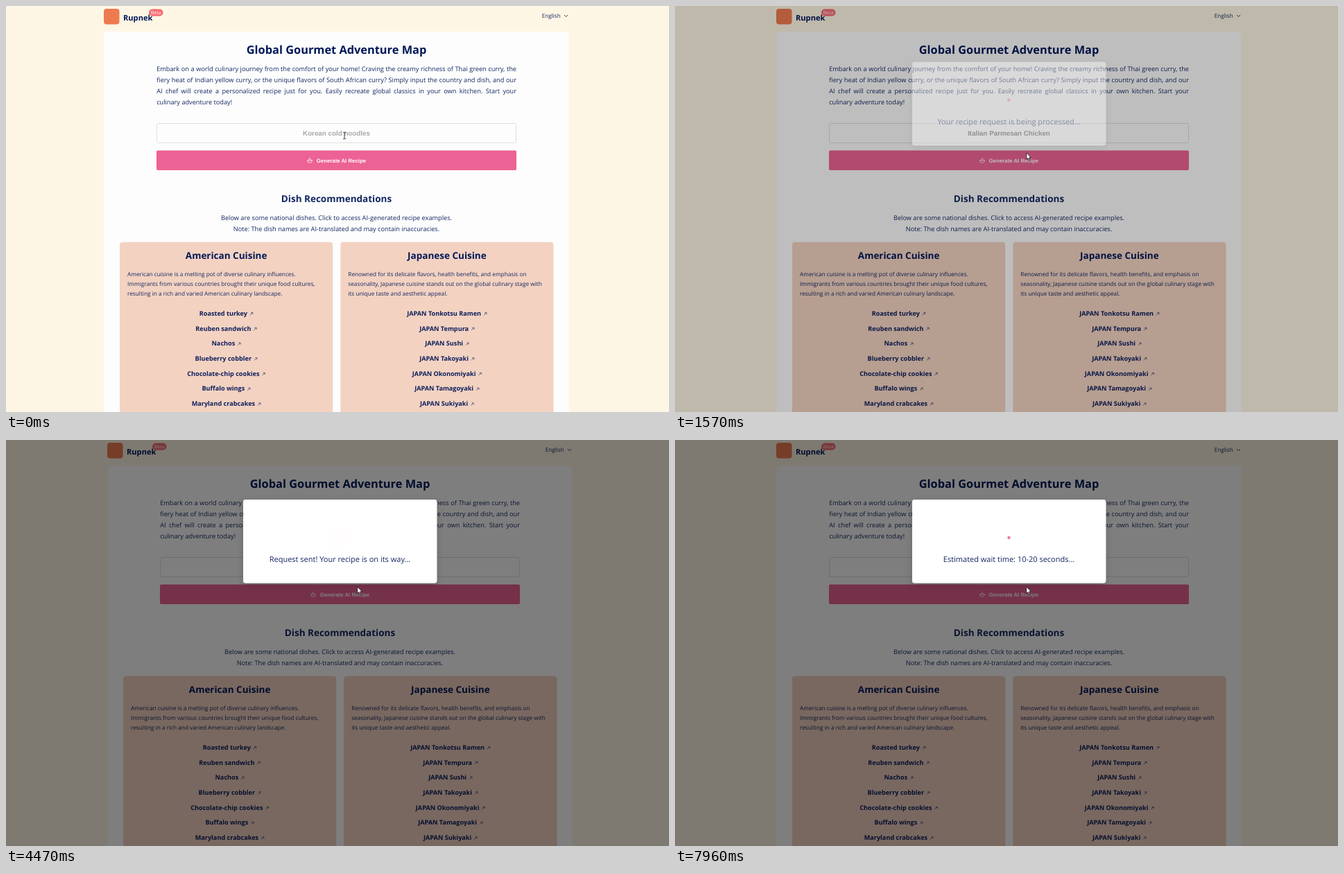
Recreate the animation shown at these times as an HTML page with a canvas. Size 956x586 px, loop 8 s.

```html
<!DOCTYPE html>
<html lang="en">
<head>
<meta charset="utf-8">
<title>Recipe generator</title>
<style>
  html, body { margin: 0; width: 100%; height: 100%; overflow: hidden; background: #fef6e4; }
  canvas { display: block; width: 956px; height: 586px; }
</style>
</head>
<body>
<canvas id="stage"></canvas>
<script>
const W = 956, H = 586, LOOP = 8000;
const canvas = document.getElementById('stage');
const ctx = canvas.getContext('2d');
const dpr = window.devicePixelRatio || 1;
canvas.width = W * dpr;
canvas.height = H * dpr;

const SANS = '"Open Sans", "Noto Sans", sans-serif';
const ARIAL = '"Liberation Sans", Arial, sans-serif';
const NAVY = '#001858', INK = '#132762';
const PINK = [237, 98, 149], PRESSED = [196, 35, 95], GREY = [222, 222, 227];

const INTRO = [
  'Embark on a world culinary journey from the comfort of your home! Craving the creamy richness of Thai green curry, the',
  'fiery heat of Indian yellow curry, or the unique flavors of South African curry? Simply input the country and dish, and our',
  'AI chef will create a personalized recipe just for you. Easily recreate global classics in your own kitchen. Start your',
  'culinary adventure today!'
];
const CARDS = [
  {
    x: 164, title: 'American Cuisine',
    about: ['American cuisine is a melting pot of diverse culinary influences.',
      'Immigrants from various countries brought their unique food cultures,',
      'resulting in a rich and varied American culinary landscape.'],
    dishes: ['Roasted turkey', 'Reuben sandwich', 'Nachos', 'Blueberry cobbler',
      'Chocolate-chip cookies', 'Buffalo wings', 'Maryland crabcakes']
  },
  {
    x: 482.3, title: 'Japanese Cuisine',
    about: ['Renowned for its delicate flavors, health benefits, and emphasis on',
      'seasonality, Japanese cuisine stands out on the global culinary stage with',
      'its unique taste and aesthetic appeal.'],
    dishes: ['Tonkotsu Ramen', 'Tempura', 'Sushi', 'Takoyaki',
      'Okonomiyaki', 'Tamagoyaki', 'Sukiyaki'].map(d => 'JAPAN ' + d)
  }
];
const MESSAGES = [
  { at: 0, lines: ['Your recipe request is being processed...'] },
  { at: 4470, lines: ['Request sent! Your recipe is on its way...'] },
  { at: 5100, lines: ['Our AI chef is hard at work creating your perfect', 'meal...'] },
  { at: 7500, lines: ['Estimated wait time: 10-20 seconds...'] }
];

const ramp = (t, a, b) => Math.min(1, Math.max(0, (t - a) / (b - a)));
const mix = (a, b, k) => `rgb(${a.map((v, i) => Math.round(v + (b[i] - v) * k))})`;

function setFont(size, weight, family = SANS) {
  ctx.font = `${weight} ${size}px ${family}`;
}

function text(str, x, y, size, color, { weight = 400, align = 'left', family = SANS } = {}) {
  setFont(size, weight, family);
  ctx.textAlign = align;
  ctx.fillStyle = color;
  ctx.fillText(str, x, y);
}

function box(x, y, w, h, r, fill) {
  ctx.beginPath();
  ctx.roundRect(x, y, w, h, r);
  ctx.fillStyle = fill;
  ctx.fill();
}

function stroke(color, width, points) {
  ctx.beginPath();
  points.forEach(([x, y], i) => i ? ctx.lineTo(x, y) : ctx.moveTo(x, y));
  ctx.strokeStyle = color;
  ctx.lineWidth = width;
  ctx.stroke();
}

function justified(str, x, y, width, size, color) {
  setFont(size, 400);
  const words = str.split(' ');
  const widths = words.map(w => ctx.measureText(w).width);
  const gap = (width - widths.reduce((a, b) => a + b, 0)) / (words.length - 1);
  words.forEach((w, i) => {
    text(w, x, y, size, color);
    x += widths[i] + gap;
  });
}

function header() {
  box(141, 4, 22.5, 22.5, 4, '#ee7b50');
  text('Rupnek', 169, 21, 11.1, NAVY, { weight: 700 });
  box(206, 4.5, 20.5, 10, 5, '#f7686f');
  text('Beta', 216.2, 12, 7.1, '#fff', { align: 'center' });
  text('English', 772.8, 17, 8.1, INK);
  stroke(INK, 0.9, [[805, 13], [807.5, 15.5], [810, 13]]);
}

function form(t) {
  const focus = t < 1400 ? ramp(t, 90, 270) : 1 - ramp(t, 1400, 1520);
  ctx.beginPath();
  ctx.roundRect(217.5, 169.5, 518, 28, 2);
  ctx.strokeStyle = mix(GREY, PINK, focus);
  ctx.lineWidth = 1;
  ctx.stroke();

  const filled = t >= 520;
  text(filled ? 'Italian Parmesan Chicken' : 'Korean cold noodles', 476.5, 187, 9.8,
    filled ? '#57575f' : '#a8a8ae', { weight: 700, align: 'center', family: ARIAL });
  if (t >= 90 && t < 1050) {
    const x = filled ? 536.5 : 476.5;
    stroke('#444', 0.7, [[x, 178.5], [x, 191]]);
  }

  const down = ramp(t, 1400, 1460) - ramp(t, 1470, 1540);
  box(217, 208.6, 519, 28.4, 2, mix(PINK, PRESSED, down));
  text('Generate AI Recipe', 447.8, 225.5, 7.8, '#fff', { weight: 700, family: ARIAL });
  potIcon(438, 223);
}

function potIcon(x, y) {
  stroke('#fff', 0.7, [[x - 4, y], [x + 4, y]]);
  ctx.beginPath();
  ctx.arc(x, y, 3.4, 0, Math.PI);
  ctx.moveTo(x - 2.6, y);
  ctx.quadraticCurveTo(x, y - 4, x + 2.6, y);
  ctx.moveTo(x, y - 2.2);
  ctx.lineTo(x, y - 4.4);
  ctx.stroke();
}

function linkArrow(x, y) {
  stroke('#3b4a78', 0.8, [[x, y + 4], [x + 3.6, y + 0.4]]);
  stroke('#3b4a78', 0.8, [[x + 1.2, y + 0.4], [x + 3.8, y + 0.4], [x + 3.8, y + 3]]);
}

function card({ x, title, about, dishes }) {
  const cx = x + 153.6;
  box(x, 340.8, 307.2, 260, 4, '#f3d2c1');
  text(title, cx, 364.5, 13.5, NAVY, { weight: 700, align: 'center' });
  about.forEach((line, i) => text(line, x + 11, 389.5 + i * 14.1, 8.25, INK));
  dishes.forEach((dish, i) => {
    const y = 446.8 + i * 21.72;
    setFont(9.15, 700);
    const w = ctx.measureText(dish).width;
    const left = cx - (w + 8.5) / 2;
    text(dish, left, y, 9.15, '#0d1f5c', { weight: 700 });
    linkArrow(left + w + 4, y - 4.6);
  });
}

function page(t) {
  ctx.save();
  // the page re-centres when its scrollbar disappears
  if (t >= 1470) ctx.translate(5, 0);
  header();
  box(141.2, 37, 670.6, 580, 5, '#fdfdfd');
  text('Global Gourmet Adventure Map', 476.5, 69, 16.37, NAVY, { weight: 700, align: 'center' });
  INTRO.forEach((line, i) => {
    const y = 94 + i * 16.1;
    if (i < INTRO.length - 1) justified(line, 217.2, y, 518.8, 9.2, INK);
    else text(line, 217.2, y, 9.2, INK);
  });
  form(t);
  text('Dish Recommendations', 476.5, 283, 13.5, INK, { weight: 700, align: 'center' });
  text('Below are some national dishes. Click to access AI-generated recipe examples.',
    476.5, 308.7, 9.2, INK, { align: 'center' });
  text('Note: The dish names are AI-translated and may contain inaccuracies.',
    476.5, 324.9, 9.2, INK, { align: 'center' });
  CARDS.forEach(card);
  ctx.restore();
}

function pulse(t, alpha) {
  const k = ((t - 1450) % 1600) / 1600;
  const p = 1 - (1 - k) ** 2;
  ctx.globalAlpha = alpha * (1 - p);
  ctx.beginPath();
  ctx.arc(481.5, 141, 16.5 * p, 0, Math.PI * 2);
  ctx.fillStyle = `rgb(${PINK})`;
  ctx.fill();
  ctx.globalAlpha = alpha;
}

// Shadow outside the panel only, so it does not show through while fading in.
function panelShadow(x, y, w, h, r) {
  ctx.save();
  ctx.beginPath();
  ctx.rect(0, 0, W, H);
  ctx.roundRect(x, y, w, h, r);
  ctx.clip('evenodd');
  ctx.shadowColor = 'rgba(0,0,0,0.16)';
  ctx.shadowBlur = 11 * dpr;
  ctx.shadowOffsetY = 3 * dpr;
  box(x, y, w, h, r, '#fff');
  ctx.restore();
}

function modal(t) {
  const show = ramp(t, 1515, 1650);
  if (!show) return;
  const { lines } = MESSAGES.filter(m => t >= m.at).pop();
  const panel = [342, 86, 279.3, 120.4 + (lines.length - 1) * 16.2, 3.5];
  ctx.save();
  ctx.globalAlpha = show;
  ctx.translate(0, -9 * (1 - show));
  panelShadow(...panel);
  box(...panel, '#fff');
  pulse(t, show);
  if (lines.length === 1) text(lines[0], 481.5, 176, 11, INK, { align: 'center' });
  else lines.forEach((line, i) => text(line, 350.6, 176 + i * 16.2, 11, INK));
  ctx.restore();
}

function pointer(t) {
  const k = ramp(t, 750, 1120);
  const e = k * k * (3 - 2 * k);
  const x = 488 + 18.8 * e, y = 187 + 25 * e;
  if (y < 198) {
    stroke('#222', 0.9, [[x, y - 4.5], [x, y + 4.5]]);
    for (const s of [-4.7, 4.7]) stroke('#222', 0.8, [[x - 2, y + s], [x + 2, y + s]]);
    return;
  }
  const shape = [[0, 0], [0, 9.4], [2.1, 7.5], [3.5, 10.7], [5, 10], [3.6, 6.9], [6.5, 6.7]];
  ctx.beginPath();
  shape.forEach(([px, py]) => ctx.lineTo(x + px, y + py));
  ctx.closePath();
  ctx.fillStyle = '#fff';
  ctx.fill();
  ctx.strokeStyle = '#111';
  ctx.lineWidth = 0.8;
  ctx.stroke();
}

function draw(t) {
  ctx.setTransform(dpr, 0, 0, dpr, 0, 0);
  ctx.textRendering = 'geometricPrecision';
  ctx.fillStyle = '#fef6e4';
  ctx.fillRect(0, 0, W, H);
  page(t);
  ctx.fillStyle = `rgba(0,0,0,${0.5 * ramp(t, 1480, 1660)})`;
  ctx.fillRect(0, 0, W, H);
  modal(t);
  pointer(t);
}

const start = performance.now();
function tick() {
  draw((performance.now() - start) % LOOP);
  requestAnimationFrame(tick);
}
tick();
</script>
</body>
</html>
```
